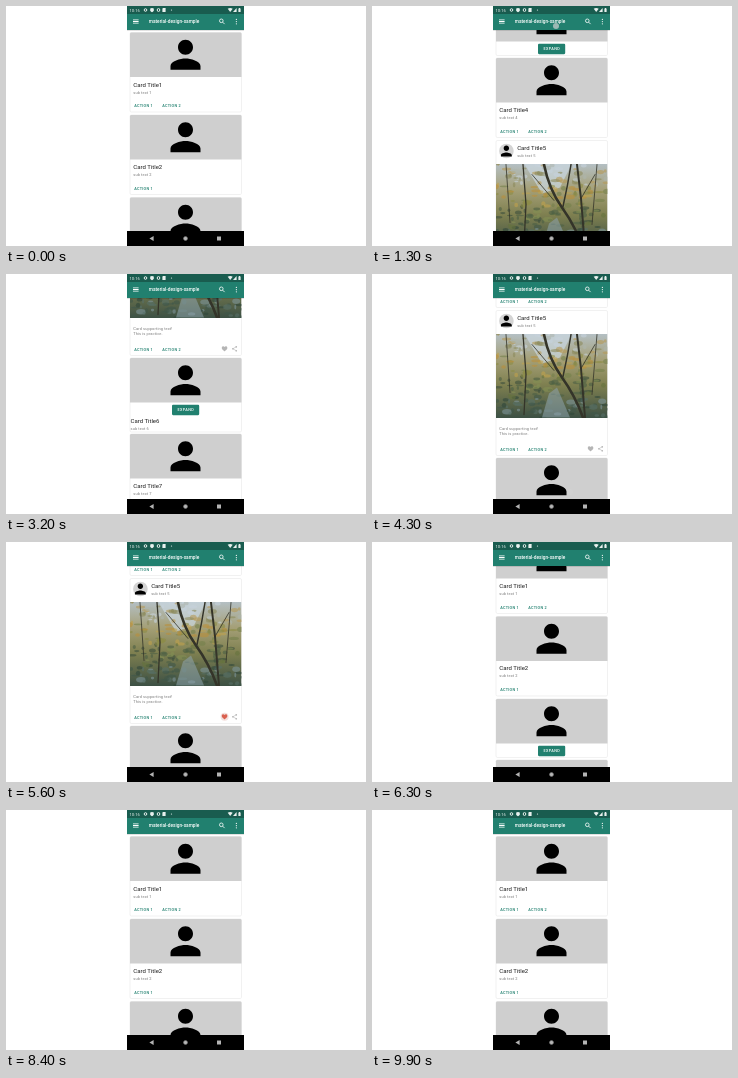
An HTML page that plays this animation: 360x240 px, repeating every 10 s.

```html
<!DOCTYPE html>
<html lang="en">
<head>
<meta charset="utf-8">
<title>Card list</title>
<style>
html, body { margin: 0; width: 100%; height: 100%; overflow: hidden; background: #fff; }
svg { display: block; width: 360px; height: 240px; }
text { font-family: Roboto, "Open Sans", sans-serif; white-space: pre; }
.title { font-size: 6px; fill: #1c1c1c; }
.sub { font-size: 4px; letter-spacing: .08px; fill: #7b7b7b; }
.action { font-size: 3.8px; font-weight: 500; letter-spacing: .25px; fill: #1f7f6e; }
.expand { font-size: 3.8px; font-weight: 500; letter-spacing: .4px; fill: #fff; }
.card { fill: #fff; stroke: #e2e2e2; stroke-width: .5; }
</style>
</head>
<body>
<svg viewBox="0 0 360 240">
  <defs>
    <path id="person" d="M12 12c2.21 0 4-1.79 4-4s-1.79-4-4-4-4 1.79-4 4 1.79 4 4 4zm0 2c-2.67 0-8 1.34-8 4v2h16v-2c0-2.66-5.33-4-8-4z"/>
    <path id="heart" d="M12 21.3l-1.4-1.3C5.4 15.4 2 12.3 2 8.5 2 5.4 4.4 3 7.5 3c1.7 0 3.4.8 4.5 2.1C13.1 3.8 14.8 3 16.5 3 19.6 3 22 5.4 22 8.5c0 3.8-3.4 6.9-8.6 11.5z"/>
    <g id="share">
      <path d="M18 5L6 12l12 7" fill="none" stroke="#b5b5b5" stroke-width="2"/>
      <circle cx="18" cy="5" r="3"/><circle cx="6" cy="12" r="3"/><circle cx="18" cy="19" r="3"/>
    </g>
    <linearGradient id="forest" x2="0" y2="1">
      <stop offset="0" stop-color="#b4bfc3"/>
      <stop offset=".3" stop-color="#a5a078"/>
      <stop offset=".6" stop-color="#7f8050"/>
      <stop offset="1" stop-color="#3c5044"/>
    </linearGradient>
    <linearGradient id="shade" x2="0" y2="1">
      <stop offset="0" stop-color="#000" stop-opacity=".2"/>
      <stop offset="1" stop-color="#000" stop-opacity="0"/>
    </linearGradient>
    <clipPath id="view"><rect x="121" y="24" width="117" height="201"/></clipPath>
    <clipPath id="frame"><rect x="124" y="23.5" width="111.5" height="84"/></clipPath>
    <clipPath id="fold"><rect id="foldBox" x="121" y="0" width="117" height="58.5"/></clipPath>
  </defs>

  <g clip-path="url(#view)"><g id="list"></g></g>

  <rect x="121" y="24" width="117" height="1.2" fill="url(#shade)"/>
  <rect x="121" width="117" height="8" fill="#195c4f"/>
  <rect x="121" y="8" width="117" height="16" fill="#21806f"/>
  <text x="123.5" y="5.6" font-size="4.2" fill="#e8f0ee">10:16</text>
  <g fill="#e8f0ee">
    <circle cx="139.5" cy="4" r="1.3" fill="none" stroke="#e8f0ee" stroke-width="1"/>
    <path d="M146 2l1.8.6v1.6q-.2 1.4-1.8 2-1.6-.6-1.8-2V2.6z"/>
    <circle cx="152.5" cy="4" r="1.8"/><rect x="151.9" y="3" width="1.2" height="2" fill="#195c4f"/>
    <path d="M157 2h2.6v4h-3.2V2.8z"/>
    <circle cx="165.5" cy="4" r=".6"/>
    <path d="M221.7 2.8q2.5-1.8 5 0L224.2 6z"/>
    <path d="M230.6 2v4h-3.6z"/>
    <path d="M232.4 2.4h.6V2h1v.4h.6V6h-2.2z"/>
    <path d="M127 13.4h5.6v.8H127zm0 1.7h5.6v.8H127zm0 1.7h5.6v.8H127z" fill="#fff"/>
    <circle cx="230.4" cy="13.4" r=".65"/><circle cx="230.4" cy="15.6" r=".65"/><circle cx="230.4" cy="17.8" r=".65"/>
  </g>
  <g fill="none" stroke="#fff" stroke-width=".8">
    <circle cx="215.3" cy="14.8" r="1.8"/><path d="M216.6 16.1l2 2"/>
  </g>
  <text x="142.8" y="17.4" font-size="4.75" font-weight="500" fill="#fff">material-design-sample</text>

  <rect x="121" y="225" width="117" height="15" fill="#000"/>
  <g fill="#b4b4b4">
    <path d="M147.6 230v5l-4.2-2.5z"/>
    <circle cx="179.5" cy="232.5" r="2" stroke="#777" stroke-width=".6"/>
    <rect x="211" y="230.5" width="4" height="4"/>
  </g>
  <circle id="touch" r="3" fill="#d2d2d2" fill-opacity=".7"/>
</svg>
<script>
const $ = id => document.getElementById(id);
const text = (cls, x, y, s, extra = "") => `<text class="${cls}" x="${x}" y="${y}" ${extra}>${s}</text>`;
const box = h => `<rect class="card" x="124" y="0" width="111.5" height="${h}" rx="1.4"/>`;
const banner = () =>
  `<path d="M124 44.5V1.4q0-1.4 1.4-1.4h108.7q1.4 0 1.4 1.4v43.1z" fill="#cfcfcf"/>
   <use href="#person" transform="translate(157 -.3) scale(1.875)"/>`;
const actions = (y, n) => text("action", 128.3, y, "ACTION 1") + (n > 1 ? text("action", 156.3, y, "ACTION 2") : "");
const group = (id, y, body) => `<g id="${id}" transform="translate(0 ${y})">${body}</g>`;

const plain = (n, y, count) => group("card" + n, y,
  box(79.5) + banner() + text("title", 127.3, 54, "Card Title" + n) +
  text("sub", 127.3, 61, "sub text " + n) + actions(74.8, count));

const folding = (n, y) => group("card" + n, y,
  `<g id="box${n}">${box(58.5)}</g>` + banner() +
  `<rect x="166" y="46.8" width="27.2" height="10.4" rx="1.1" fill="#21806f"/>` +
  text("expand", 179.8, 53.4, "EXPAND", 'text-anchor="middle"') +
  (n === 6 ? `<g clip-path="url(#fold)">${text("title", 124.5, 65.2, "Card Title6")}${text("sub", 124.5, 72.2, "sub text 6")}</g>` : ""));

// Woodland scene: soft gradient, seeded leaves, a few trunks
function scene() {
  let seed = 11;
  const rnd = () => (seed = seed * 16807 % 2147483647) / 2147483647;
  const bands = [
    ["#c7d3dc", "#b69a58", "#8c8a5c", "#aeb6ae"],
    ["#b98f3c", "#8d8c45", "#c0a24e", "#75804c"],
    ["#66733f", "#4b6045", "#849054", "#3d4f3c"],
    ["#2f463b", "#587068", "#40574a", "#7d959a"]
  ];
  let s = `<rect x="124" y="23.5" width="111.5" height="84" fill="url(#forest)"/>
    <path d="M152 23h48l-12 24-18 6z" fill="#cbd8e0" opacity=".7"/>`;
  for (let i = 0; i < 230; i++) {
    const v = rnd(), band = bands[Math.min(3, Math.floor(v * 4))];
    s += `<ellipse cx="${(124 + rnd() * 112).toFixed(1)}" cy="${(23.5 + v * 84).toFixed(1)}" rx="${(1 + rnd() * 4).toFixed(1)}" ry="${(.7 + rnd() * 2).toFixed(1)}" fill="${band[Math.floor(rnd() * 4)]}" opacity=".6"/>`;
  }
  s += `<path d="M170 107l7-24 8-6 4 9 9 21z" fill="#8ea5ad" opacity=".55"/>
    <g fill="none" stroke="#343429" stroke-linecap="round">
      <path d="M172 24q5 25 18 43t21 40" stroke-width="2.6"/>
      <path d="M199 24q-3 20-8 42" stroke-width="1.5"/>
      <path d="M205 24l4 34 4 49" stroke-width="2"/>
      <path d="M151 24l3 40-2 40" stroke-width="1.3"/>
      <path d="M134 24l4 58M225 24l-5 60M182 60l-22-26M209 58l14-24" stroke-width=".8"/>
    </g>`;
  return `<g clip-path="url(#frame)">${s}</g>`;
}

const photoCard = group("card5", 335,
  box(145) + `<circle cx="134.4" cy="10.5" r="7.3" fill="#d4d4d4"/>
  <use href="#person" transform="translate(126.2 2.4) scale(.68)"/>` +
  text("title", 145.2, 9.8, "Card Title5") + text("sub", 145.2, 16.6, "sub text 5") + scene() +
  text("sub", 127.3, 119.6, "Card supporting text!") + text("sub", 127.3, 124.3, "This is practice.") +
  actions(140.6, 2) +
  `<circle id="halo" cx="218.6" cy="138.3" r="4" fill="#e9c9c4"/>
  <use id="like" href="#heart" transform="translate(215.2 135) scale(.28)"/>
  <use href="#share" fill="#b5b5b5" transform="translate(225.2 134.9) scale(.28)"/>`);

$("list").innerHTML = `<rect x="121" width="117" height="700" fill="#fff"/>` +
  plain(1, 26.5, 2) + plain(2, 109, 1) + folding(3, 191.5) + plain(4, 252.5, 2) +
  photoCard + folding(6, 482.5) + plain(7, 543, 2);

const linear = p => p;
const glide = p => 1 - (1 - p) ** 3;
const smooth = p => p * p * (3 - 2 * p);

// [start, end, from, to, easing]
const scrollSteps = [
  [600, 1300, 0, 200.5, smooth],
  [1300, 2200, 200.5, 398.5, glide],
  [3500, 4300, 398.5, 298.5, smooth],
  [5800, 6100, 298.5, 160, linear],
  [6100, 6600, 160, 0, glide]
];
const foldSteps = [[2600, 2900, 58.5, 74, smooth]];
// [start, end, x, from y, to y, easing]
const touches = [
  [600, 1300, 184, 220.5, 20, smooth],
  [2400, 2600, 179.5, 136, 136, linear],
  [3500, 4300, 198, 118, 218, smooth],
  [5300, 5500, 218.6, 174.8, 174.8, linear],
  [5800, 6100, 190, 66, 204.5, linear]
];

function valueAt(steps, t) {
  let v = steps[0][2];
  for (const [a, b, from, to, ease] of steps)
    if (t >= a) v = from + (to - from) * ease(Math.min(1, (t - a) / (b - a)));
  return v;
}

function draw(now) {
  const t = Math.floor(now % 10000 / 100) * 100;
  const h = valueAt(foldSteps, t);
  $("list").setAttribute("transform", `translate(0 ${-valueAt(scrollSteps, t)})`);
  $("box6").firstChild.setAttribute("height", h);
  $("foldBox").setAttribute("height", h);
  $("card7").setAttribute("transform", `translate(0 ${484.5 + h})`);
  $("like").setAttribute("fill", t >= 5500 ? "#d9604f" : "#b5b5b5");
  $("halo").setAttribute("opacity", t >= 5500 && t < 5700 ? .6 : 0);
  const hit = touches.find(([a, b]) => t >= a && t <= b);
  $("touch").setAttribute("opacity", hit ? 1 : 0);
  if (hit) {
    const [a, b, x, from, to, ease] = hit;
    $("touch").setAttribute("cx", x);
    $("touch").setAttribute("cy", from + (to - from) * ease((t - a) / (b - a)));
  }
}

const start = performance.now();
function tick() {
  draw(performance.now() - start);
  requestAnimationFrame(tick);
}
tick();
</script>
</body>
</html>
```
